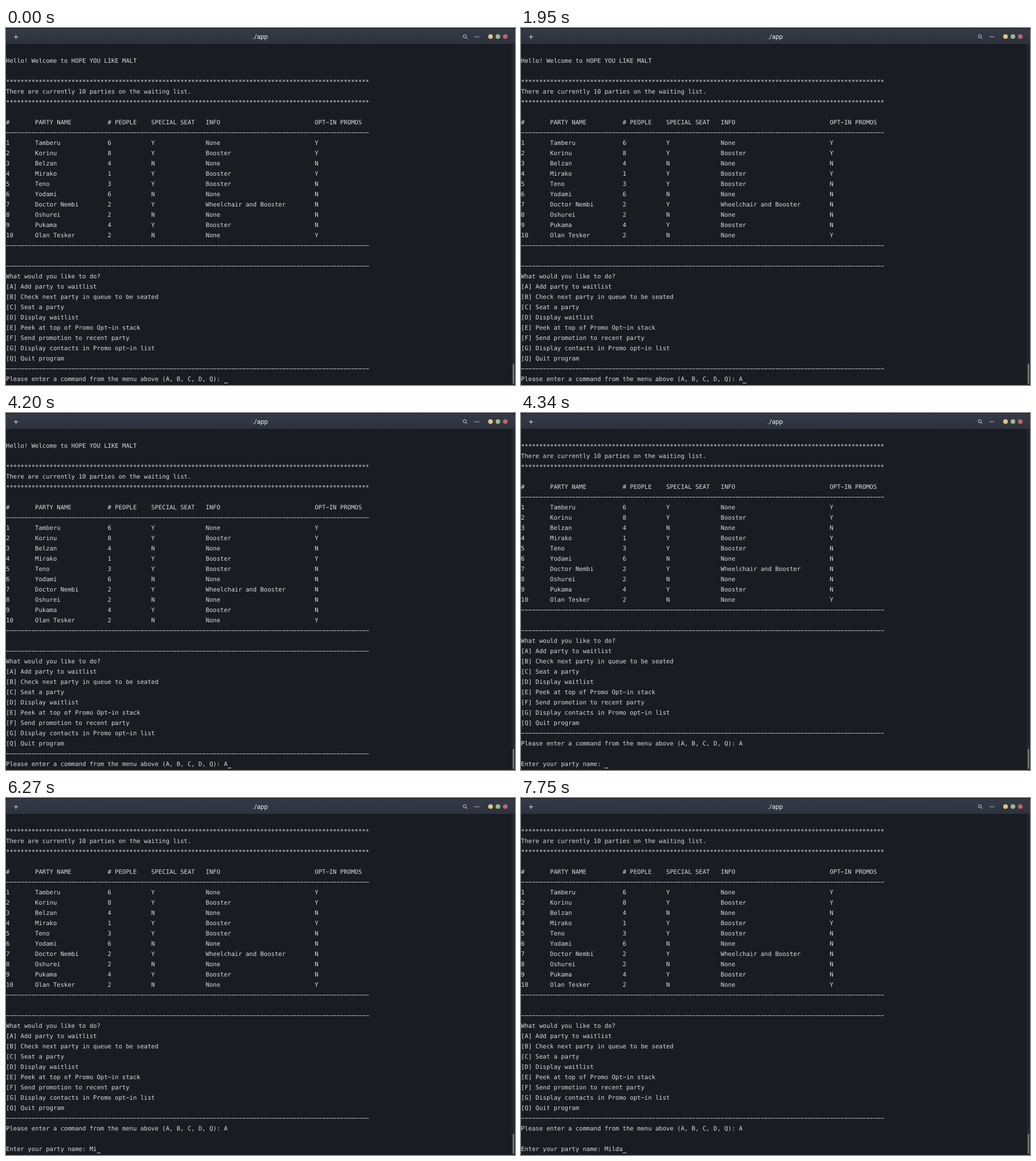
Animation of 894 by 626 pixels, one loop 8 s. Source, as an HTML page:

```html
<!DOCTYPE html>
<html lang="en">
<head>
<meta charset="utf-8">
<title>./app</title>
<style>
  html, body { margin: 0; width: 100%; height: 100%; overflow: hidden; background: #191c21; }
  svg { display: block; }
  #lines text {
    font: 10.6px "DejaVu Sans Mono", monospace;
    font-variant-ligatures: none;
    fill: #d8dbdf;
    white-space: pre;
    text-rendering: geometricPrecision;
  }
  .title { font: 11.5px Roboto, "Noto Sans", sans-serif; fill: #eceff4; text-anchor: middle; text-rendering: geometricPrecision; }
  .icon { fill: none; stroke: #d8dee9; stroke-width: 1; }
</style>
</head>
<body>
<svg width="894" height="626" viewBox="0 0 894 626">
  <defs>
    <linearGradient id="bar" x1="0" y1="0" x2="0" y2="1">
      <stop offset="0" stop-color="#343a47"/>
      <stop offset="1" stop-color="#2d323e"/>
    </linearGradient>
  </defs>
  <rect width="894" height="626" fill="#191c21"/>
  <g id="lines"></g>
  <rect id="cursor" y="622" width="6.4" height="1" fill="#d8dbdf"/>

  <rect x="888" y="29" width="6" height="597" fill="#23262c"/>
  <rect x="890" y="589" width="2.5" height="35" rx="1.2" fill="#7b7e83"/>

  <rect width="894" height="29" fill="#15181c"/>
  <path d="M0 28V5Q0 1 4 1H890Q894 1 894 5V28Z" fill="url(#bar)"/>
  <text class="title" x="446.5" y="19">./app</text>
  <path class="icon" d="M14 15.5H21.5M17.5 12V19.5"/>
  <circle class="icon" cx="805.8" cy="14.5" r="2.7"/>
  <path class="icon" d="M807.8 16.5L810.5 19.2"/>
  <g fill="#d8dee9">
    <circle cx="824" cy="15.3" r=".9"/>
    <circle cx="827" cy="15.3" r=".9"/>
    <circle cx="830" cy="15.3" r=".9"/>
  </g>
  <circle cx="851" cy="15" r="4.1" fill="#e6c477"/>
  <circle cx="864" cy="15" r="4.1" fill="#9cba83"/>
  <circle cx="877" cy="15" r="4.1" fill="#c0626c"/>
</svg>
<script>
const LOOP = 8000, CHAR_W = 6.382, ROW_H = 18, FIRST_BASELINE = 61;
const PROMPT = "Please enter a command from the menu above (A, B, C, D, Q): ";
const ASK_NAME = "Enter your party name: ";
const GUEST = "Milda";

const rule = "-".repeat(100), stars = "*".repeat(100);
const columns = [8, 20, 12, 15, 30, 0];
const row = cells => cells.map((cell, i) => String(cell).padEnd(columns[i])).join("");

const parties = [
  ["Tamberu", 6, "Y", "None", "Y"],
  ["Korinu", 8, "Y", "Booster", "Y"],
  ["Belzan", 4, "N", "None", "N"],
  ["Mirako", 1, "Y", "Booster", "Y"],
  ["Teno", 3, "Y", "Booster", "N"],
  ["Yodami", 6, "N", "None", "N"],
  ["Doctor Nembi", 2, "Y", "Wheelchair and Booster", "N"],
  ["Oshurei", 2, "N", "None", "N"],
  ["Pukama", 4, "Y", "Booster", "N"],
  ["Olan Tesker", 2, "N", "None", "Y"]
];

const screen = [
  "Hello! Welcome to HOPE YOU LIKE MALT",
  "",
  stars,
  "There are currently 10 parties on the waiting list.",
  stars,
  "",
  row(["#", "PARTY NAME", "# PEOPLE", "SPECIAL SEAT", "INFO", "OPT-IN PROMOS"]),
  rule,
  ...parties.map((party, i) => row([i + 1, ...party])),
  rule,
  "",
  rule,
  "What would you like to do?",
  "[A] Add party to waitlist",
  "[B] Check next party in queue to be seated",
  "[C] Seat a party",
  "[D] Display waitlist",
  "[E] Peek at top of Promo Opt-in stack",
  "[F] Send promotion to recent party",
  "[G] Display contacts in Promo opt-in list",
  "[Q] Quit program",
  rule,
  PROMPT,
  "",
  ASK_NAME
];

const lines = document.getElementById("lines");
const cursor = document.getElementById("cursor");

const rows = screen.map((text, i) => {
  const el = document.createElementNS("http://www.w3.org/2000/svg", "text");
  // the terminal face has lower asterisks and long hyphens
  const drop = text === stars ? 1 : 0;
  el.setAttribute("x", 0);
  el.setAttribute("y", FIRST_BASELINE + i * ROW_H + drop);
  el.textContent = text.replace(/-/g, "\u2212");
  lines.append(el);
  return el;
});
const nameRow = rows[rows.length - 1];
const promptRow = rows[rows.length - 3];

const SCROLL_AT = 4340;
const COMMAND_AT = 1950;
const KEYS = [5830, 6270, 6420, 6560, 6560];
const BLINKS = [600, 1200, 2550, 3150, 3750, 4200, 4790, 5380, 7160, 7750];
const passed = (times, t) => times.filter(at => at <= t).length;

let last = "";
function draw(t) {
  const scrolled = t >= SCROLL_AT;
  const command = PROMPT + (t >= COMMAND_AT ? "A" : "");
  const name = ASK_NAME + GUEST.slice(0, passed(KEYS, t));
  const lit = passed(BLINKS, t) % 2 === 0;
  const active = scrolled ? name : command;

  const state = active + lit;
  if (state === last) return;
  last = state;

  promptRow.textContent = command;
  nameRow.textContent = name;
  nameRow.style.display = scrolled ? "" : "none";
  lines.setAttribute("transform", `translate(0 ${scrolled ? -2 * ROW_H : 0})`);
  cursor.setAttribute("x", active.length * CHAR_W);
  cursor.style.display = lit ? "" : "none";
}

const start = performance.now();
function tick() {
  draw((performance.now() - start) % LOOP);
  requestAnimationFrame(tick);
}
draw(0);
requestAnimationFrame(tick);
</script>
</body>
</html>
```
